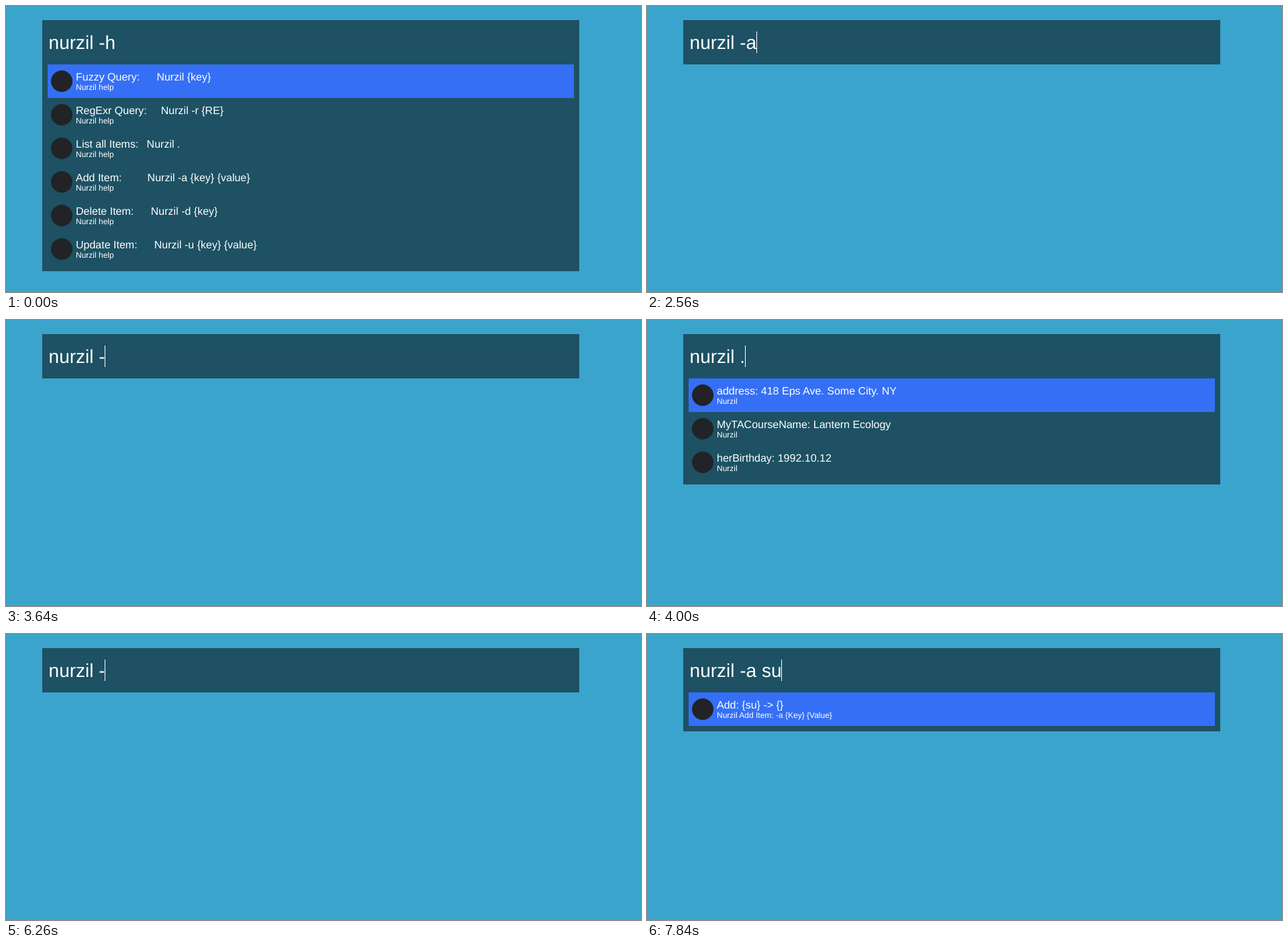
Animation of 946 by 426 pixels, one loop 7990 ms. Source, as an HTML page:

```html
<!DOCTYPE html>
<html lang="en">
<head>
<meta charset="utf-8">
<title>Launcher demo</title>
<style>
html, body { margin: 0; width: 100%; height: 100%; overflow: hidden; background: #3ba4cc; }
svg { display: block; }
text {
  fill: #fff;
  font-family: "Liberation Sans", Arial, sans-serif;
  text-rendering: geometricPrecision;
  white-space: pre;
}
.query { font-size: 28px; }
.title { font-size: 16px; }
.sub { font-size: 12px; }
</style>
</head>
<body>
<svg id="stage" width="946" height="426" viewBox="0 0 946 426"></svg>
<script>
const LOOP = 7990;

// Row: [title, subtitle, usage, usage x]
const help = [
  ["Fuzzy Query:", "Nurzil {key}", 224.4],
  ["RegExr Query:", "Nurzil -r {RE}", 230.8],
  ["List all Items:", "Nurzil .", 209.6],
  ["Add Item:", "Nurzil -a {key} {value}", 210.6],
  ["Delete Item:", "Nurzil -d {key}", 215.8],
  ["Update Item:", "Nurzil -u {key} {value}", 220.7]
].map(([title, usage, x]) => [title, "Nurzil help", usage, x]);

const items = [
  "address: 418 Eps Ave. Some City. NY",
  "MyTACourseName: Lantern Ecology",
  "herBirthday: 1992.10.12"
].map(title => [title, "Nurzil"]);

const none = [];
const hint = [["Nurzil -h", "Nurzil help"]];
const add = key => [[`Add: {${key}} -> {}`, "Nurzil Add Item: -a {Key} {Value}"]];

// Step: [start ms, typed text, caret x, rows]
const steps = [
  [0, "-h", 163, help],
  [2410, "-", 147, help],
  [2560, "-a", 163, none],
  [2680, "-a", 163, add("")],
  [3640, "-", 147, none],
  [3760, "", 138, none],
  [3880, ".", 146, hint],
  [4000, ".", 146, items],
  [5270, "", 138, items.slice(0, 1)],
  [5420, "", 138, hint],
  [6260, "-", 147, none],
  [6400, "-a", 163, none],
  [6530, "-a ", 171, add("")],
  [7690, "-a s", 185, add("")],
  [7840, "-a su", 200, add("su")]
];

const caretOff = [[0, 270], [700, 1390], [1820, 2410], [3080, 3640], [4440, 5000], [5830, 6260], [7110, 7540]];

const stage = document.getElementById("stage");

function shape(name, attrs, parent) {
  const node = document.createElementNS("http://www.w3.org/2000/svg", name);
  for (const key in attrs) node.setAttribute(key, attrs[key]);
  return parent.appendChild(node);
}

function box(x, y, width, height, fill, parent) {
  return shape("rect", { x, y, width, height, fill }, parent);
}

function label(x, y, kind, content, parent) {
  shape("text", { x, y, class: kind }, parent).textContent = content;
}

function drawRow([title, sub, usage, usageX], i, parent) {
  const y = 87 + i * 50;
  if (i === 0) box(62, y, 784, 50, "#356ff5", parent);
  shape("circle", { cx: 83, cy: y + 25, r: 16, fill: "#222326" }, parent);
  label(104, y + 24, "title", title, parent);
  if (usage) label(usageX, y + 24, "title", usage, parent);
  label(104, y + 38, "sub", sub, parent);
}

const scenes = steps.map(([start, typed, caretX, rows]) => {
  const group = shape("g", { visibility: "hidden" }, stage);
  const height = 66 + (rows.length ? rows.length * 50 + 8 : 0);
  box(54, 21, 800, height, "#1d5163", group);
  rows.forEach((row, i) => drawRow(row, i, group));
  label(63.6, 64, "query", "nurzil " + typed, group);
  return { start, caretX, group };
});

const caret = box(0, 38, 1, 32, "#fff", stage);
const origin = performance.now();
let shown = null;

function render(now) {
  const t = Math.max(0, now - origin) % LOOP;
  const scene = scenes.filter(s => s.start <= t).pop();
  if (scene !== shown) {
    if (shown) shown.group.setAttribute("visibility", "hidden");
    scene.group.setAttribute("visibility", "visible");
    caret.setAttribute("x", scene.caretX);
    shown = scene;
  }
  const hidden = caretOff.some(([from, to]) => t >= from && t < to);
  caret.setAttribute("visibility", hidden ? "hidden" : "visible");
  requestAnimationFrame(render);
}
render(origin);
</script>
</body>
</html>
```
